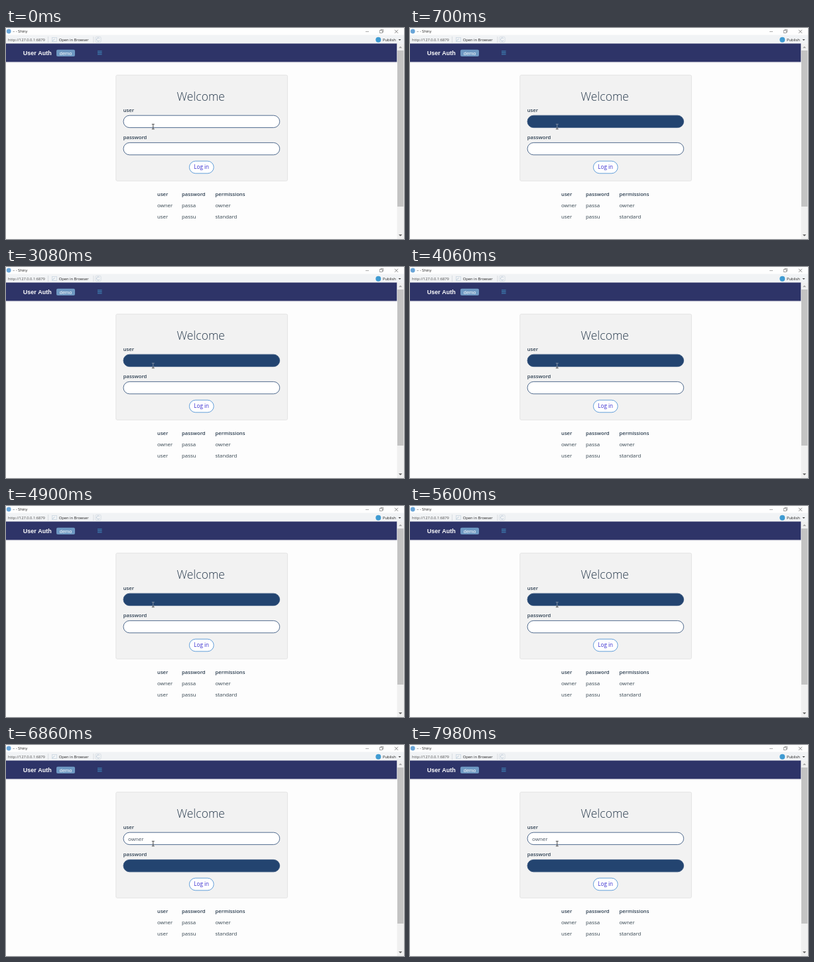
An HTML page with a canvas that plays this animation: 600x319 px, repeating every 8 s.

```html
<!DOCTYPE html>
<html lang="en">
<head>
<meta charset="utf-8">
<title>Login</title>
<style>
html, body { margin: 0; width: 100%; height: 100%; overflow: hidden; background: #fdfdfd; }
canvas { display: block; width: 600px; height: 319px; }
</style>
</head>
<body>
<canvas id="stage"></canvas>
<script>
const W = 600, H = 319, LOOP = 8000;
const USER_FOCUS = 560, PASS_FOCUS = 5740;
const SANS = '"Open Sans", "Noto Sans", sans-serif';
const ARIAL = '"Liberation Sans", Arial, sans-serif';
const NAVY = '#234470', INK = '#2c3e50';

const canvas = document.getElementById('stage');
const ctx = canvas.getContext('2d');
const dpr = window.devicePixelRatio || 1;
canvas.width = W * dpr;
canvas.height = H * dpr;

function rect(x, y, w, h, color) {
  ctx.fillStyle = color;
  ctx.fillRect(x, y, w, h);
}

function pill(x, y, w, h, r, fill, stroke, width = 1) {
  ctx.beginPath();
  ctx.roundRect(x, y, w, h, r);
  if (fill) { ctx.fillStyle = fill; ctx.fill(); }
  if (stroke) { ctx.strokeStyle = stroke; ctx.lineWidth = width; ctx.stroke(); }
}

function disc(x, y, r, color) {
  ctx.beginPath();
  ctx.arc(x, y, r, 0, Math.PI * 2);
  ctx.fillStyle = color;
  ctx.fill();
}

function line(color, width, ...pts) {
  ctx.beginPath();
  for (let i = 0; i < pts.length; i += 2) ctx.lineTo(pts[i], pts[i + 1]);
  ctx.strokeStyle = color;
  ctx.lineWidth = width;
  ctx.stroke();
}

function text(str, x, y, size, color, weight = 400, family = SANS) {
  ctx.font = `${weight} ${size}px ${family}`;
  ctx.fillStyle = color;
  ctx.fillText(str, x, y);
}

function triangle(x, y, r, dir, color) {
  ctx.beginPath();
  ctx.moveTo(x - r, y - dir * r / 2);
  ctx.lineTo(x + r, y - dir * r / 2);
  ctx.lineTo(x, y + dir * r / 2);
  ctx.fillStyle = color;
  ctx.fill();
}

function drawWindow() {
  rect(0, 0, W, 10.5, '#fefefe');
  disc(4.2, 5, 3.4, '#69a5d8');
  text('~ - Shiny', 10, 7.2, 5.7, '#222');
  line('#777', 0.6, 542, 5.5, 547, 5.5);
  ctx.strokeStyle = '#666';
  ctx.lineWidth = 0.6;
  ctx.strokeRect(563.5, 3.7, 3.8, 3.8);
  line('#666', 0.6, 565, 3.7, 565, 2.4, 568.8, 2.4, 568.8, 6.2, 567.3, 6.2);
  line('#555', 0.7, 586, 2.8, 591, 7.8);
  line('#555', 0.7, 591, 2.8, 586, 7.8);

  rect(0, 10.5, W, 13, '#f1f3f5');
  text('http://127.0.0.1:6879', 3, 20, 5.75, '#4c4c4c');
  rect(63, 13, 0.8, 9, '#d4d8dc');
  ctx.strokeStyle = '#cbd8e2';
  ctx.lineWidth = 0.8;
  ctx.strokeRect(69.5, 14.5, 7, 6);
  line('#a9c1d4', 0.8, 70, 19.5, 73.5, 16.5);
  text('Open in Browser', 79.8, 20, 5.75, '#222');
  rect(131.5, 13, 0.8, 9, '#d4d8dc');
  pill(134.8, 13.2, 8.4, 8.4, 2, null, '#d3dbe2', 0.8);
  ctx.beginPath();
  ctx.arc(139, 17.4, 2.5, 0.5, 5.6);
  ctx.strokeStyle = '#b9c9d6';
  ctx.lineWidth = 0.9;
  ctx.stroke();
  disc(561.3, 17.7, 4, '#3f9bd2');
  text('Publish', 568, 20, 5.8, '#222');
  triangle(593.5, 18, 2, 1, '#444');
}

function drawNavbar() {
  rect(0, 23.5, 589.5, 28, '#2e3468');
  rect(0, 51.5, 589.5, 1, '#d9dae4');
  text('User Auth', 25.7, 40.7, 9, '#fff', 700, ARIAL);
  pill(76, 32.7, 28, 10.3, 2, '#6e98c2');
  text('demo', 80.8, 40.6, 7.4, '#fff', 400, ARIAL);
  for (let i = 0; i < 3; i++) rect(138, 34.5 + i * 2.4, 6.6, 1.1, '#3f88bb');
}

function drawScrollbar() {
  rect(589.5, 23.5, 10.5, H - 23.5, '#f0f0f0');
  rect(590, 34, 9.3, 236, '#c3c3c3');
  triangle(594.6, 29, 2.6, -1, '#a0a0a0');
  triangle(594.6, 313.5, 2.6, 1, '#555');
}

function drawTable() {
  const cols = [228, 265, 315.5];
  const rows = [
    ['user', 'password', 'permissions'],
    ['owner', 'passa', 'owner'],
    ['user', 'passu', 'standard']
  ];
  rows.forEach((row, r) => row.forEach((cell, c) =>
    text(cell, cols[c], 254 + r * 17, r ? 7.9 : 7.7, r ? '#34444f' : INK, r ? 400 : 600)));
}

function drawPointer(onDark) {
  const top = onDark ? '#8b97aa' : '#333';
  line(top, 0.9, 221.8, 145.5, 221.8, 150.5);
  line('#333', 0.9, 221.8, 150.5, 221.8, 152.8);
  line(top, 0.8, 219.8, 145.4, 223.8, 145.4);
  line('#333', 0.8, 219.8, 152.8, 223.8, 152.8);
}

function drawField(label, y, focused, value) {
  text(label, 176.7, y - 5.5, 7.7, INK, 600);
  pill(177, y, 235.6, 18.4, 9.2, focused ? NAVY : '#fff', '#34537d', 0.85);
  if (!focused) text(value, 184, y + 12.3, 8, '#45525f');
}

function drawForm(focus) {
  pill(165.8, 71.2, 258.6, 160, 2, '#f2f2f2', '#e2e2e2', 0.9);
  text('Welcome', 257.5, 110, 17.5, INK, 300);
  drawField('user', 132.2, focus === 'user', focus ? 'owner' : '');
  drawField('password', 173.4, focus === 'password', '');
  pill(276.4, 201.2, 36.8, 18.6, 9.3, '#fff', '#4a8fd4', 0.85);
  text('Log in', 283.2, 213.4, 8.2, '#3a2fd0');
}

function draw(t) {
  const focus = t < USER_FOCUS ? '' : t < PASS_FOCUS ? 'user' : 'password';
  ctx.setTransform(dpr, 0, 0, dpr, 0, 0);
  rect(0, 0, W, H, '#fdfdfd');
  drawWindow();
  drawNavbar();
  drawScrollbar();
  drawForm(focus);
  drawTable();
  drawPointer(focus === 'user');
}

const start = performance.now();
function tick() {
  draw((performance.now() - start) % LOOP);
  requestAnimationFrame(tick);
}
tick();
</script>
</body>
</html>
```
